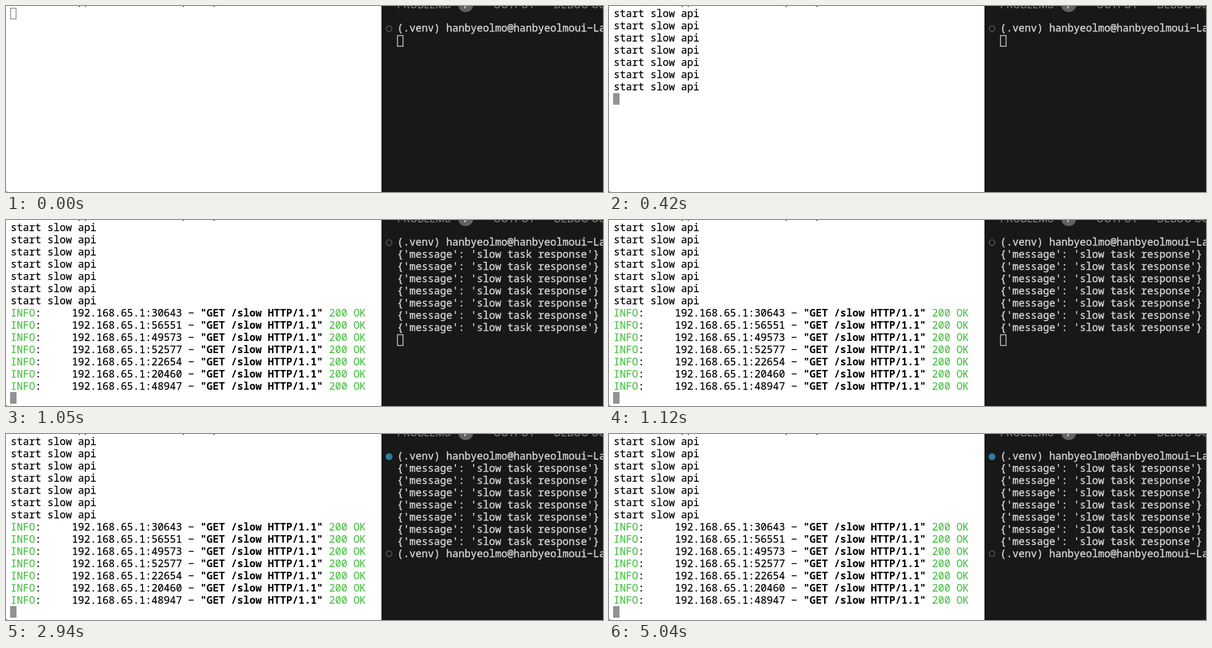
Recreate the animation shown at these times as an HTML page. Size 1024 by 320 pixels, loop 5.11 s.

```html
<!DOCTYPE html>
<html lang="en">
<head>
<meta charset="utf-8">
<title>Slow API calls</title>
<style>
  html, body { margin: 0; width: 100%; height: 100%; overflow: hidden; background: #fff; }
  svg { display: block; width: 1024px; height: 320px; }
  text { font: 17.5px "Noto Sans Mono", "DejaVu Sans Mono", monospace; white-space: pre; }
  .log { fill: #000; stroke: #000; stroke-width: 0.25; }
  .log .ok { fill: #4fc24a; stroke: #4fc24a; }
  .log .req { font-weight: 700; stroke: none; }
  .term { fill: #d0d0d0; stroke: #d0d0d0; stroke-width: 0.45; }
  .tab { font: 17px Inter, "Liberation Sans", sans-serif; fill: #8c8c8c; }
  .cursor { fill: none; stroke: #929292; stroke-width: 1.5; }
  .cursor.solid { fill: #929292; }
  .cursor.light { stroke: #c8c8c8; }
  .ring { fill: none; stroke: #525252; stroke-width: 1.8; }
  .done { fill: #2b7c9e; }
</style>
</head>
<body>
<svg id="stage" viewBox="0 0 1024 320"></svg>
<script>
const LOOP = 5110, LINE = 21;
const START = 420, FIRST = 910, ALL = 1050, EXIT = 2520;
const NS = "http://www.w3.org/2000/svg";
const stage = document.getElementById("stage");
const timed = [];

function add(parent, tag, attrs, content) {
  const el = document.createElementNS(NS, tag);
  for (const key in attrs) el.setAttribute(key, attrs[key]);
  if (content !== undefined) el.textContent = content;
  parent.appendChild(el);
  return el;
}

// Show an element only while from <= time < to.
function during(el, from, to = LOOP) {
  timed.push({ el, from, to });
  return el;
}

const label = (cls, x, y, str) => add(stage, "text", { class: cls, x, y }, str);
const cursor = (cls, x, y) =>
  add(stage, "rect", { class: "cursor " + cls, x, y, width: 9.5, height: 18.5 });
const dot = (cls, y, r) => add(stage, "circle", { class: cls, cx: 657, cy: y, r });
const logY = row => 19.3 + row * LINE;
const termY = row => 44.4 + row * LINE;

function request(row, port) {
  const line = label("log", 8, logY(row), "");
  const span = (str, cls = "") => add(line, "tspan", { class: cls }, str);
  span("INFO", "ok");
  span(":     192.168.65.1:" + port + " − ");
  span('"GET /slow HTTP/1.1"', "req");
  span(" 200 OK", "ok");
  return line;
}

// Server log
label("log", 8, -2.7, "INFO:     Application startup complete.");
during(cursor("", 7.8, 3.8), 0, START);
for (let i = 0; i < 7; i++) during(label("log", 8, logY(i), "start slow api"), START);
during(cursor("solid", 7.8, 150.6), START, ALL);
[30643, 56551, 49573, 52577, 22654, 20460, 48947]
  .forEach((port, i) => during(request(7 + i, port), ALL));
during(cursor("solid", 7.8, 296.8), ALL);
add(stage, "path", { d: "M0 317V320H3Q0.5 319.5 0 317Z", fill: "#777" });

// Client terminal
add(stage, "rect", { x: 644, y: 0, width: 380, height: 320, fill: "#181818" });
label("tab", 671, 3.5, "PROBLEMS");
add(stage, "circle", { cx: 788.5, cy: -2.5, r: 13, fill: "#616161" });
label("tab", 784, 3.5, "7").style.fill = "#f0f0f0";
label("tab", 836, 3.5, "OUTPUT");
label("tab", 940, 3.5, "DEBUG CONSOLE");

const prompt = "(.venv) hanbyeolmo@hanbyeolmoui−Laptop";
label("term", 671, termY(0), prompt);
during(dot("ring", 39, 4.8), 0, EXIT);
during(dot("done", 39, 6), EXIT);
for (let i = 1; i <= 7; i++) {
  during(label("term", 671, termY(i), "{'message': 'slow task response'}"), i === 1 ? FIRST : ALL);
}
during(cursor("light", 671.5, 50.8), 0, FIRST);
during(cursor("light", 671.5, 71.8), FIRST, ALL);
during(cursor("light", 671.5, 197.4), ALL, EXIT);
during(label("term", 671, termY(8), prompt), EXIT);
during(dot("ring", 206, 4.8), EXIT);

function draw(now) {
  const t = now % LOOP;
  for (const { el, from, to } of timed) {
    el.style.visibility = t >= from && t < to ? "visible" : "hidden";
  }
  requestAnimationFrame(draw);
}
draw(performance.now());
</script>
</body>
</html>
```
